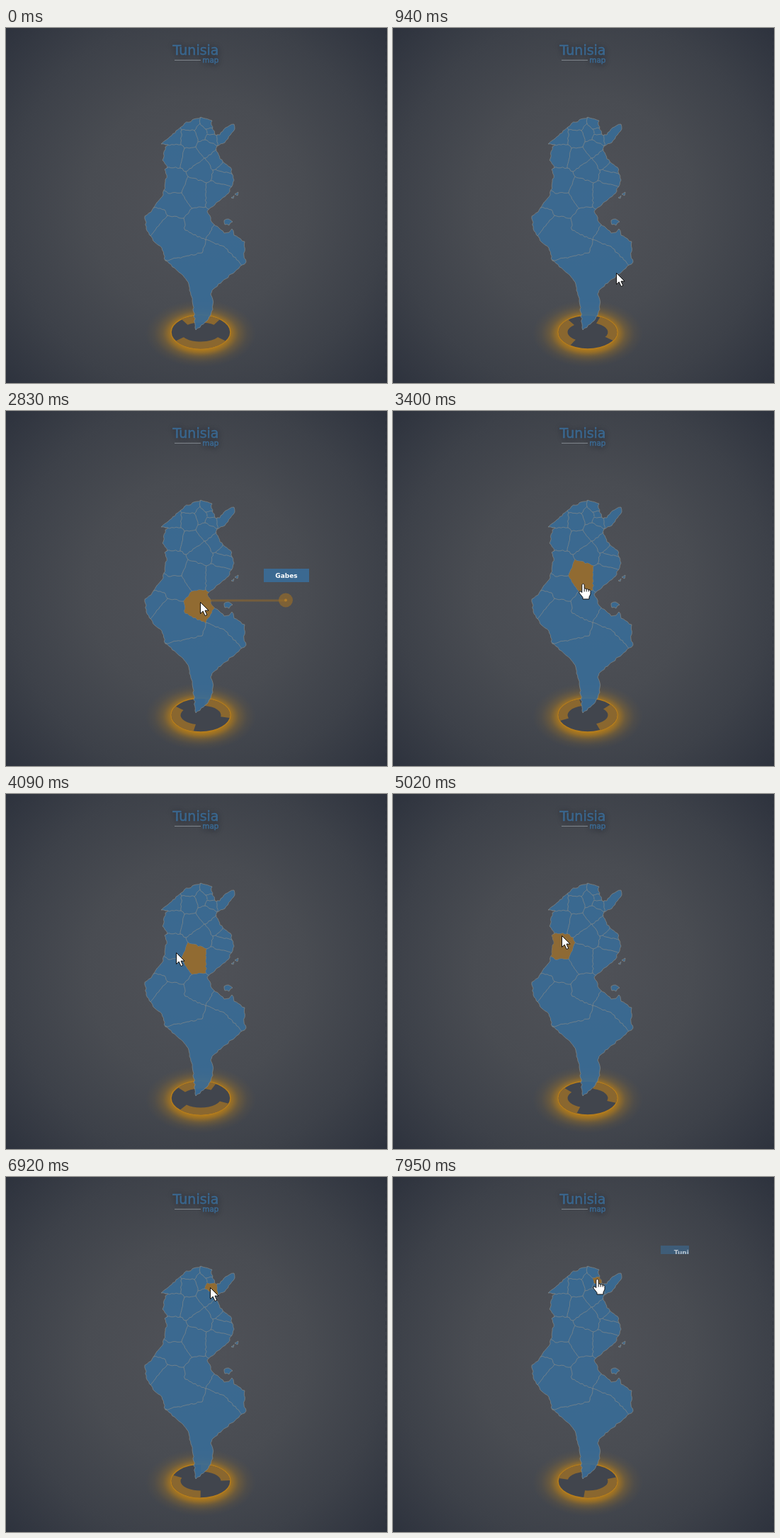
These frames come from a looping animation (538x502 px, 8 s). An HTML page with a canvas:

```html
<!DOCTYPE html>
<html lang="en">
<head>
<meta charset="utf-8">
<title>Tunisia map</title>
<style>
html, body { margin: 0; width: 100%; height: 100%; overflow: hidden; background: #30353f; }
canvas { display: block; }
</style>
</head>
<body>
<canvas id="stage" width="538" height="502"></canvas>
<script>
const ctx = document.getElementById('stage').getContext('2d');
const W = 538, H = 502, LOOP = 8000, TAU = Math.PI * 2;
const BLUE = '#3b6991', ORANGE = '#916b32';
const clamp = v => Math.max(0, Math.min(1, v));
const ease = v => v * v * (3 - 2 * v);
const mix = (a, b, k) => a + (b - a) * k;
const points = s => s.trim().split(/\s+/).map(p => p.split(',').map(Number));
const noise = n => { const v = Math.sin(n) * 43758.5453; return (v - Math.floor(v)) * 2 - 1; };

// Ragged line: the jitter depends only on the end points, so both sides of a border agree.
function rough(path, a, b) {
  const dx = b[0] - a[0], dy = b[1] - a[1], len = Math.hypot(dx, dy) || 1;
  const n = Math.max(1, Math.round(len / 3.2));
  const back = dx < 0 || (dx === 0 && dy < 0);
  const seed = (a[0] + b[0]) * 7.3 + (a[1] + b[1]) * 3.1;
  for (let k = 1; k < n; k++) {
    const off = (back ? -1.1 : 1.1) * noise(seed + (back ? n - k : k));
    path.lineTo(a[0] + dx * k / n - dy / len * off, a[1] + dy * k / n + dx / len * off);
  }
  path.lineTo(b[0], b[1]);
}
function outline(pts) {
  const path = new Path2D();
  path.moveTo(pts[0][0], pts[0][1]);
  pts.forEach((p, i) => rough(path, p, pts[(i + 1) % pts.length]));
  path.closePath();
  return path;
}

const land = outline(points(`219,164 234,152 247,140 252,135 275,126 291,131 290,137 296,152 302,151
 310,141 322,136 323,143 309,162 298,167 297,174 302,185 317,197 319,206 322,215 314,234 295,250
 284,259 291,275 301,283 308,290 315,289 319,284 322,293 337,302 336,322 339,331 318,348 293,369
 289,376 292,384 292,398 284,414 268,427 264,392 258,362 250,350 225,329 220,311 210,303 198,284
 196,266 205,260 222,236 227,208 224,200 228,197 221,187 225,168 229,165`));
const islands = ['308,272 314,270 320,274 315,279 309,278', '318,240 322,237 321,241', '323,235 328,232 327,237']
  .map(s => outline(points(s)));

// Governorates are the cells nearest to their seed points.
const seeds = Object.entries({
  Tataouin: '266,336 297,316', Medenine: '304,296 316,298', Kebili: '260,306 232,284',
  Tozeur: '209,265', Gafsa: '238,249 214,244', Gabes: '273,279', Sfax: '299,231',
  'Sidi Bouzid': '267,230', Kasserine: '236,218', Kef: '237,177', Siliana: '263,182',
  Kairouan: '277,201', Sousse: '298,187', Monastir: '309,198', Mahdia: '306,209',
  Zaghouan: '283,167', Jendouba: '236,153', Beja: '259,155', Bizerte: '260,135',
  Manouba: '277,149', Ariana: '288,137', Tunis: '290,145', 'Ben Arous': '290,154', Nabeul: '306,153'
}).flatMap(([name, s]) => points(s).map(at => ({ name, at })));

// Cut a cell by the bisector towards another seed; each corner keeps the owner beyond its next edge.
function cut(cell, a, b) {
  const nx = b.at[0] - a.at[0], ny = b.at[1] - a.at[1];
  const dist = p => (p.x - (a.at[0] + b.at[0]) / 2) * nx + (p.y - (a.at[1] + b.at[1]) / 2) * ny;
  const out = [];
  cell.forEach((p, i) => {
    const q = cell[(i + 1) % cell.length], dp = dist(p), dq = dist(q);
    if (dp <= 0) out.push(p);
    if ((dp <= 0) !== (dq <= 0)) {
      const k = dp / (dp - dq);
      out.push({ x: mix(p.x, q.x, k), y: mix(p.y, q.y, k), owner: dp <= 0 ? b : p.owner });
    }
  });
  return out;
}

const borders = new Path2D();
const fills = {};
for (const a of seeds) {
  let cell = [{ x: 0, y: 0 }, { x: W, y: 0 }, { x: W, y: H }, { x: 0, y: H }];
  for (const b of seeds) if (b !== a) cell = cut(cell, a, b);
  const pts = cell.map(p => [Math.round(p.x), Math.round(p.y)]);
  (fills[a.name] ||= new Path2D()).addPath(outline(pts));
  cell.forEach((p, i) => {
    if (!p.owner || p.owner.name <= a.name) return;
    borders.moveTo(pts[i][0], pts[i][1]);
    rough(borders, pts[i], pts[(i + 1) % pts.length]);
  });
}

// The pointer rests on each stop from "from" to "to".
const stop = (name, x, y, from, to) => ({ name, x, y, from, to, end: x + (x > 260 ? 121 : -121) });
const stops = [
  stop('Tataouin', 298, 308, 1110, 1900),
  stop('Gabes', 274, 267, 2375, 3000),
  stop('Sidi Bouzid', 268, 241, 3330, 3880),
  stop('Kasserine', 238, 219, 4110, 4800),
  stop('Kef', 238, 187, 5120, 5960),
  stop('Beja', 257, 153, 6380, 6580),
  stop('Ben Arous', 288, 153, 6870, 7480),
  stop('Tunis', 288, 141, 7684, 9000)
];

const arrow = new Path2D('M0 0V16L3.7 12.6L6.6 19L9.3 17.8L6.5 11.6H11.6Z');
const hand = new Path2D('M-1.7 1Q0 -1.3 1.7 1V7Q3.4 5.6 4.7 7.6Q6.5 6.2 7.7 8.4Q10 7.5 10.5 10V14.5L8.5 18.5V21.5H-.5V19L-5.7 12.5Q-6 9.5 -3.4 10.5L-1.7 12.2Z');

function disc(x, y, r, fill) {
  ctx.beginPath();
  ctx.arc(x, y, r, 0, TAU);
  ctx.fillStyle = fill;
  ctx.fill();
}
function radial(x, y, r0, r1, stops) {
  const g = ctx.createRadialGradient(x, y, r0, x, y, r1);
  stops.forEach(([k, color]) => g.addColorStop(k, color));
  return g;
}

function drawBack() {
  ctx.fillStyle = radial(269, 251, 0, 370,
    [[0, '#505258'], [.42, '#494c52'], [.72, '#3d4149'], [1, '#2d323d']]);
  ctx.fillRect(0, 0, W, H);
  ctx.fillStyle = 'rgba(35,40,50,.35)';
  for (let y = 4; y < H; y += 10) ctx.fillRect(536, y, 1, 5);
}

function drawTitle() {
  ctx.save();
  ctx.shadowColor = 'rgba(25,30,40,.55)';
  ctx.shadowBlur = 9;
  ctx.shadowOffsetY = 1;
  ctx.fillStyle = ctx.strokeStyle = '#3c6c96';
  ctx.lineWidth = .5;
  ctx.textAlign = 'right';
  for (const [text, size, y] of [['Tunisia', 19, 38], ['map', 10.5, 49]]) {
    ctx.font = size + 'px "DejaVu Sans", sans-serif';
    ctx.fillText(text, 300.5, y);
    ctx.strokeText(text, 300.5, y);
  }
  ctx.restore();
  ctx.fillStyle = '#80868d';
  ctx.fillRect(238, 45, 37, 1);
}

function drawRing(t) {
  ctx.save();
  ctx.translate(275, 432);
  ctx.scale(1, .61);
  ctx.fillStyle = radial(0, 0, 37, 78, [[0, 'rgba(196,132,18,.85)'], [.18, 'rgba(188,128,22,.66)'],
    [.4, 'rgba(170,120,32,.36)'], [.7, 'rgba(150,110,40,.12)'], [1, 'rgba(130,100,50,0)']]);
  ctx.fillRect(-80, -80, 160, 160);
  ctx.restore();

  ctx.beginPath();
  ctx.ellipse(275, 430, 42, 24, 0, 0, TAU);
  ctx.fillStyle = '#41454d';
  ctx.fill();
  ctx.strokeStyle = '#b67d1c';
  ctx.lineWidth = 1.5;
  ctx.stroke();

  // Perspective widens the near band and narrows the far one.
  const tilt = a => a - .2 * Math.cos(a);
  const mid = Math.PI / 2 + t * .001487;
  ctx.fillStyle = '#8a672f';
  for (const a of [mid, mid + Math.PI]) {
    const a0 = tilt(a - .86), a1 = tilt(a + .86);
    ctx.beginPath();
    ctx.ellipse(275, 430, 41.5, 23.6, 0, a0, a1);
    ctx.ellipse(275, 430, 28.5, 13.5, 0, a1, a0, true);
    ctx.fill();
  }
}

function drawMap(t) {
  ctx.save();
  ctx.lineJoin = 'round';
  ctx.lineWidth = .8;
  ctx.strokeStyle = 'rgba(147,143,135,.75)';
  ctx.fillStyle = '#396c97';
  for (const p of [land, ...islands]) {
    ctx.globalAlpha = .9;
    ctx.fill(p);
    ctx.globalAlpha = 1;
    ctx.stroke(p);
  }
  ctx.clip(land);
  ctx.stroke(borders);
  ctx.fillStyle = ORANGE;
  for (const s of stops) {
    ctx.globalAlpha = clamp(Math.min(t - s.from, s.to + 250 - t) / 30);
    if (ctx.globalAlpha) ctx.fill(fills[s.name]);
  }
  ctx.restore();
}

// The label unfolds first, then the line runs out to a pulsing dot; closing runs backwards.
function drawCall(s, t) {
  const e = Math.min(t - s.from - 120, s.to + 160 - t) / 250;
  if (e <= 0) return;
  const open = ease(clamp(e)), reach = clamp((e - 1) / .3);
  if (reach) {
    const pulse = (1 - Math.cos(TAU * (t - 2830) / 740)) / 2;
    ctx.strokeStyle = 'rgba(150,107,40,.55)';
    ctx.lineWidth = 3;
    ctx.beginPath();
    ctx.moveTo(s.x, s.y + 1);
    ctx.lineTo(mix(s.x, s.end, reach), s.y + 1);
    ctx.stroke();
    disc(s.end, s.y + .5, mix(10, 13.3, pulse) * reach, `rgba(150,108,42,${mix(.68, .46, pulse)})`);
    disc(s.end, s.y + .5, 2, '#b07c2b');
  }
  const x = s.end - 31, y = s.y - 44;
  ctx.save();
  ctx.globalAlpha = open;
  ctx.beginPath();
  ctx.rect(x, y, Math.round(64 * open), Math.round(19 * open));
  ctx.clip();
  ctx.fillStyle = BLUE;
  ctx.fillRect(x, y, 64, 19);
  ctx.fillStyle = '#fff';
  ctx.font = 'bold 9px "DejaVu Sans", sans-serif';
  ctx.textAlign = 'center';
  ctx.fillText(s.name, x + 32, y + 13);
  ctx.restore();
}

function drawPointer(t) {
  if (t < 450) return;
  const i = stops.findIndex(s => t < s.to), next = stops[i];
  const last = stops[i - 1] || { x: 366, y: 443, to: 450 };
  const k = clamp((t - last.to) / (next.from - last.to));
  const over = t > next.from + 60 && t < next.to - 200;
  const shape = over ? hand : arrow;
  ctx.save();
  ctx.translate(Math.round(mix(last.x, next.x, k)) + .5, Math.round(mix(last.y, next.y, k)) + 3.5);
  ctx.fillStyle = '#fff';
  ctx.strokeStyle = '#111';
  ctx.lineWidth = 1;
  ctx.fill(shape);
  ctx.stroke(shape);
  if (over) {
    ctx.beginPath();
    for (let x = 1.7; x < 8; x += 3) {
      ctx.moveTo(x, 7.5);
      ctx.lineTo(x, 11);
    }
    ctx.stroke();
  }
  ctx.restore();
}

function frame() {
  const t = performance.now() % LOOP;
  drawBack();
  drawTitle();
  drawRing(t);
  drawMap(t);
  for (const s of stops) drawCall(s, t);
  drawPointer(t);
  requestAnimationFrame(frame);
}
frame();
</script>
</body>
</html>
```
